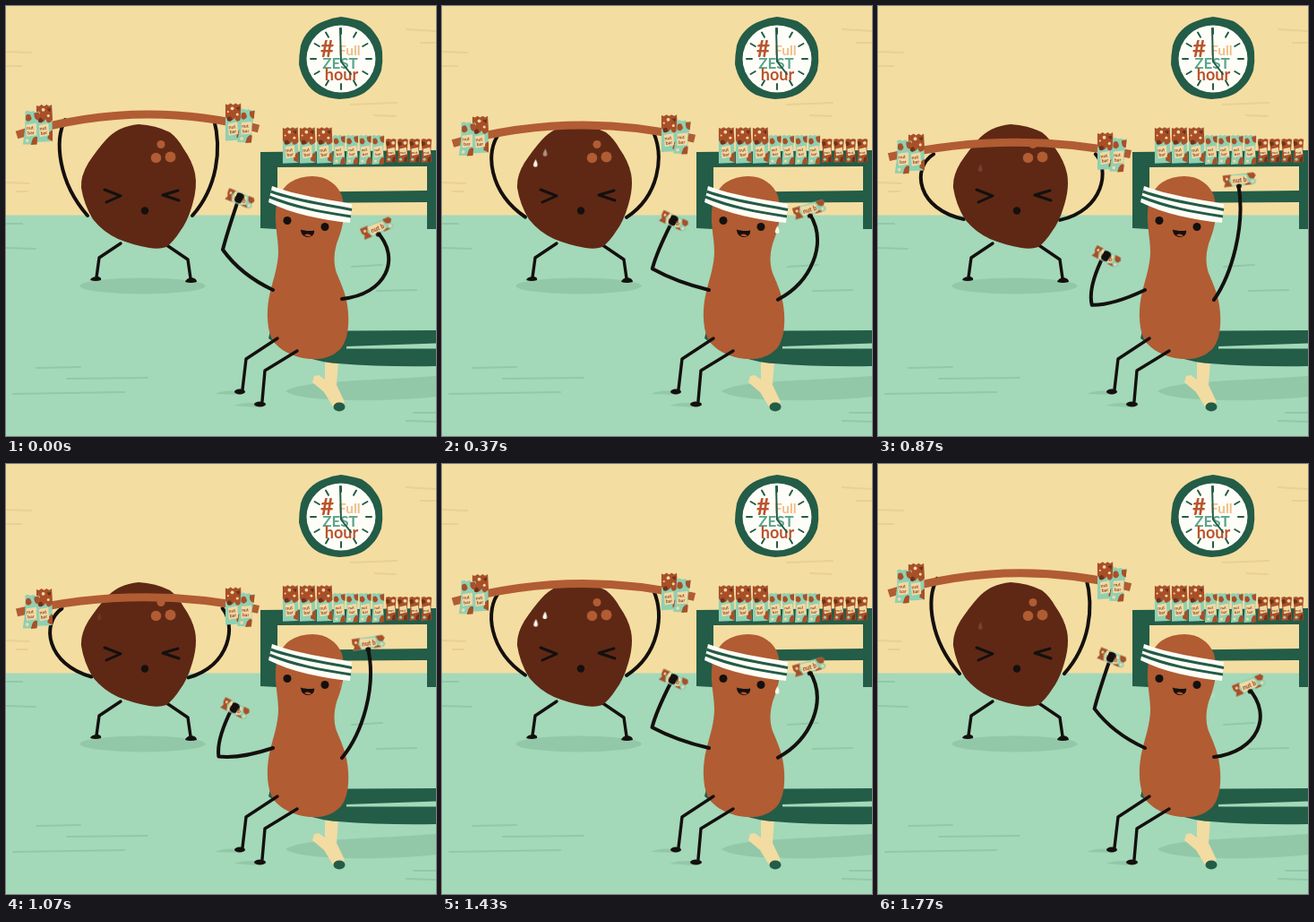
Animation, 480 px wide and 480 px high, one loop 1.81 s. Source, as an HTML page:

```html
<!DOCTYPE html>
<html lang="en">
<head>
<meta charset="utf-8">
<title>Workout snacks</title>
<style>
  html, body { margin: 0; width: 100%; height: 100%; overflow: hidden; background: #f4dda1; }
  svg { display: block; width: 100vw; height: 100vh; }
  text { font-family: Lato, "Open Sans", sans-serif; font-weight: 700; }

  .green { fill: #235c47; }
  .nut { fill: #b15c33; }
  .shade { fill: #92c8a8; }
  .ink { fill: #14100e; }
  .line { fill: none; stroke: #14100e; stroke-width: 3.4; stroke-linecap: round; stroke-linejoin: round; }
  .arm { stroke-width: 4; }
  .wall, .floor { fill: none; stroke-width: 2; stroke-linecap: round; }
  .wall { stroke: #e8d096; }
  .floor { stroke: #92c8aa; }

  /* One lift lasts half a loop and is then played backwards. */
  .lift {
    animation: 905ms cubic-bezier(.37, .15, .63, .85) infinite alternate;
  }
  #weights { animation-name: weights; }
  #rod { animation-name: rod; }
  #ballArmL { animation-name: ballArmL; }
  #ballArmR { animation-name: ballArmR; }
  #armL { animation-name: armL; }
  #armR { animation-name: armR; }
  #barL { animation-name: barL; }
  #barR { animation-name: barR; }

  @keyframes weights { to { transform: translateY(33px); } }
  @keyframes rod {
    from { d: path("M12 144Q147 102 282 137"); }
    to { d: path("M12 169Q147 138 282 166"); }
  }
  @keyframes ballArmL {
    from { d: path("M91 234C58 196 54 150 66 127"); }
    to { d: path("M96 238C44 228 36 182 62 166"); }
  }
  @keyframes ballArmR {
    from { d: path("M208 234C236 202 241 160 232 126"); }
    to { d: path("M203 239C253 228 259 182 243 166"); }
  }
  @keyframes armL {
    0% { d: path("M298 317Q262 300 242 272Q246 256 258 220"); animation-timing-function: cubic-bezier(.37, .15, .685, .575); }
    50% { d: path("M298 317Q262 311 232.500 300Q237 282 255 250"); animation-timing-function: cubic-bezier(.315, .425, .63, .85); }
    100% { d: path("M298 317Q262 335 239 335Q234 316 251 281"); }
  }
  @keyframes armR {
    0% { d: path("M375 327C424 322 442 282 414 252"); animation-timing-function: cubic-bezier(.37, .15, .685, .575); }
    50% { d: path("M375 328C408 304 428 260 409 225"); animation-timing-function: cubic-bezier(.315, .425, .63, .85); }
    100% { d: path("M375 328C394 300 410 245 402 198"); }
  }
  @keyframes barL {
    from { transform: translate(261px, 215px) rotate(22deg); }
    to { transform: translate(255px, 281px) rotate(28deg); }
  }
  @keyframes barR {
    from { transform: translate(414px, 248px) rotate(-23deg); }
    to { transform: translate(403px, 193px) rotate(-6deg); }
  }

  .drop { fill: #fdf8ec; opacity: 0; animation: 905ms linear infinite; }
  #dropA { animation-name: dropA; }
  #dropB { animation-name: dropB; }
  #dropC { animation-name: dropC; }
  @keyframes dropA {
    0%, 29% { transform: translate(115px, 160px); opacity: 0; }
    53% { opacity: 1; }
    70% { opacity: 1; }
    96% { opacity: .13; }
    100% { transform: translate(114px, 182px); opacity: 0; }
  }
  @keyframes dropB {
    0%, 17% { transform: translate(104px, 170px); opacity: 0; }
    36% { transform: translate(104px, 175px); opacity: 1; }
    68% { opacity: 1; }
    88%, 100% { transform: translate(105px, 181px); opacity: 0; }
  }
  @keyframes dropC {
    0%, 17% { transform: translate(374px, 246px); opacity: 0; }
    36% { opacity: 1; }
    70% { opacity: 1; }
    96% { opacity: .1; }
    100% { transform: translate(374px, 259px); opacity: 0; }
  }
</style>
</head>
<body>
<svg viewBox="0 0 480 480" preserveAspectRatio="none">
  <defs>
    <symbol id="pack" viewBox="0 0 20 44" overflow="visible">
      <path fill="#8fd0b2" d="M1 2L19 1L20 43L1 44Z"/>
      <path fill="#a94f28" d="M1 1L4 2L7 0L10 2L13 0L16 2L19 0L20 18Q14 25 12 17Q7 25 1 16Z"/>
      <path fill="#a94f28" d="M14 40Q15 31 20 30V43Z"/>
      <path fill="#6f321b" d="M3 17Q7 13 9 19Q6 23 3 20ZM13 5L18 4L17 9Z"/>
      <g fill="#f2d9a3">
        <circle cx="9" cy="6" r="2"/><circle cx="15" cy="13" r="1.6"/><circle cx="4" cy="10" r="1.1"/>
        <path d="M4 24L15 22L16 36L5 38Z"/>
      </g>
      <g font-size="5.500" fill="#8d4224" transform="rotate(-8 10 30)">
        <text x="5" y="29.500">nut</text><text x="5.500" y="35">bar</text>
      </g>
    </symbol>
    <symbol id="mintPack" viewBox="0 0 14 34" overflow="visible">
      <path fill="#8fd0b2" d="M0 1L3 0L5 1L8 0L11 1L14 0L13 17L14 33L0 34L1 17Z"/>
      <path fill="#a94f28" d="M1 5Q5 1 7 8Q4 13 1 9ZM9 2L14 1V9Q9 9 9 2ZM9 29Q11 24 14 26V33L8 34Z"/>
      <path fill="#f2d9a3" d="M2 14L12 12L13 24L3 26Z"/>
      <circle cx="4" cy="30" r="1.7" fill="#f2d9a3"/>
      <g font-size="4.500" fill="#8d4224" transform="rotate(-8 7 19)">
        <text x="3" y="18.500">nut</text><text x="3.500" y="23.500">bar</text>
      </g>
    </symbol>
    <symbol id="brownPack" viewBox="0 0 12 28" overflow="visible">
      <path fill="#a94f28" d="M0 1L3 0L6 1L9 0L12 1L11 14L12 27L0 28L1 14Z"/>
      <path fill="#6f321b" d="M0 4Q4 1 5 7L1 9ZM8 22L11 20V27H7Z"/>
      <path fill="#f2d9a3" d="M2 12L10 10L11 18L3 20Z"/>
      <circle cx="8.500" cy="5" r="2" fill="#f2d9a3"/>
      <circle cx="3.500" cy="24" r="1.700" fill="#8fd0b2"/>
      <text x="2.500" y="17.500" font-size="4.500" fill="#8d4224">nut</text>
    </symbol>
    <g id="bar">
      <path fill="#8fd0b2" d="M-17 -6L-15 -4L-17 -1L-15 2L-17 6H16L18 3L16 0L18 -3L16 -6Z"/>
      <path fill="#a94f28" d="M-17 -6H-8L-11 0L-8 6H-17L-15 2L-17 -1ZM9 -6H16L18 -3L16 0Q10 1 9 -6ZM5 6Q9 1 13 6Z"/>
      <path fill="#f2d9a3" d="M-9 -5L8 -4L9 4L-8 5Z"/>
      <g fill="#f2d9a3"><circle cx="-13" cy="-2" r="1.500"/><circle cx="14" cy="3" r="1.600"/></g>
      <text x="-7" y="2.500" font-size="6.500" fill="#8d4224">nut b</text>
    </g>
    <path id="drop" d="M.6 -4.500Q3 1 2.500 2.500A2.500 2.500 0 0 1 -2.300 2Q-2 -.5 .6 -4.500Z"/>
  </defs>

  <!-- Room -->
  <rect width="480" height="480" fill="#f4dda1"/>
  <rect y="233.500" width="480" height="247" fill="#a3d8b9"/>
  <path class="wall" d="M0 51L28 52M0 67H17M447 26L480 28M463 41H480M385 110L436 108M411 122L435 123M0 197L26 198M12 207H24"/>
  <path class="floor" d="M0 243H18M0 270L33 271M34 404L83 403M68 416L158 415M8 433L132 431M414 318L458 317M386 291L420 289M455 454H480M447 463L480 464"/>

  <!-- Clock -->
  <path class="green" d="M374 12C383 13 390 15 397 17Q407 23 412 31Q419 40 420 51Q421 62 419 72Q415 83 409 89Q401 98 391 101Q382 104 372 104Q360 103 350 99Q340 94 335 85Q329 76 327 65Q327 55 329 44Q332 34 339 27Q346 20 355 17Q364 13 374 12Z"/>
  <ellipse cx="374" cy="59" rx="38.500" ry="37.500" fill="#fffdf8"/>
  <g id="ticks" stroke="#235c47" stroke-width="2" stroke-linecap="round"></g>
  <text x="351" y="57" font-size="26" fill="#b9552c">#</text>
  <text x="371" y="55" font-size="15.500" fill="#edc086">Full</text>
  <text x="373" y="70" font-size="17" text-anchor="middle" fill="#5aa48a">ZEST</text>
  <text x="374.500" y="83" font-size="18" text-anchor="middle" fill="#b9552c">hour</text>
  <path d="M373 25L374 62L385 76" fill="none" stroke="#235c47" stroke-width="2" stroke-linecap="round" stroke-linejoin="round"/>

  <!-- Shelf -->
  <path class="green" d="M284 163L480 161V249H470V219L303 220L302 249L284 248ZM303 180V208L470 206V179Z" fill-rule="evenodd"/>
  <g id="shelf"></g>

  <!-- Lifter -->
  <ellipse class="shade" cx="152.500" cy="312.500" rx="70" ry="9"/>
  <path class="line" d="M128 265L104 281L101 303M178 266L203 283L206 304"/>
  <path class="ink" d="M94 306Q95 302 103 302Q107 303 106 306Q100 308 94 306ZM200 308Q201 304 207 303Q213 304 213 308Q206 310 200 308Z"/>
  <path id="ballArmL" class="line arm lift" d="M91 234C58 196 54 150 66 127"/>
  <path id="ballArmR" class="line arm lift" d="M208 234C236 202 241 160 232 126"/>
  <path fill="#5e2815" d="M148 132Q167 133 183 141Q192 148 198 159Q208 173 211 187Q214 202 208 222Q203 240 194 252Q187 263 179 269Q171 272 160 270Q142 267 125 260Q108 252 97 238Q87 222 84 203Q83 190 92 175Q102 160 111 150Q125 134 148 132Z"/>
  <g class="nut">
    <circle cx="173" cy="154.500" r="4.500"/><circle cx="167.500" cy="169.500" r="5.800"/><circle cx="183.500" cy="168.500" r="6"/>
  </g>
  <path class="line" style="stroke-width: 3" d="M110 205L128 212L112 219M192 206L175 211L193 217"/>
  <circle class="ink" cx="155" cy="228.500" r="4.200"/>
  <use id="dropA" class="drop" href="#drop"/>
  <use id="dropB" class="drop" href="#drop"/>
  <path id="rod" class="lift" d="M12 144Q147 102 282 137" fill="none" stroke="#b15c33" stroke-width="9"/>
  <g id="weights" class="lift">
    <use href="#pack" x="33" y="108" width="19" height="46"/>
    <use href="#mintPack" x="20" y="117" width="16" height="38" transform="rotate(4 28 136)"/>
    <use href="#pack" x="244" y="107" width="19" height="45"/>
    <use href="#mintPack" x="260" y="115" width="16" height="38" transform="rotate(6 268 134)"/>
  </g>

  <!-- Bench -->
  <path class="shade" d="M312 430C330 418 400 419 480 413V436C430 442 330 443 312 430Z"/>
  <path fill="#f2dca2" d="M356 392L371 396L369 423L378 442L366 449L355 431L342 420L344 413L349 412L356 417Z"/>
  <ellipse class="green" cx="372" cy="447.500" rx="6.500" ry="5"/>
  <path class="green" d="M295 363L480 362V402Q420 403 370 399C345 398 310 384 293 371Z"/>
  <path fill="#a3d8b9" d="M380 380L480 376.500V382.500L380 382.500Z"/>

  <!-- Sitter -->
  <path class="shade" d="M233 433Q246 427 264 431L262 434ZM254 446Q268 441 284 444L280 448Z"/>
  <path class="nut" d="M342 190C358 190 370 199 375 212C380 230 376 246 371 260C366 273 365 286 369 298C375 312 381 325 382 343C383 359 381 373 374 382C366 391 354 395 340 394C323 393 305 385 297 372C290 357 291 335 295 319C299 303 304 289 304 274C304 260 300 246 301 230C302 216 307 204 317 197Q328 190 342 190Z"/>
  <path class="line" d="M303 371L268 394L264 428M325 385L289 407L286 441"/>
  <ellipse class="ink" cx="261" cy="430.500" rx="6" ry="3"/>
  <ellipse class="ink" cx="283.500" cy="444.500" rx="6.500" ry="3"/>
  <path fill="#fffdf6" d="M297 201C326 212 356 215 386 221L384 242C353 239 319 232 293 219Z"/>
  <path d="M295.500 207C325 218 355 221 386 227.500M294 213C323 225 353 230 385 235" fill="none" stroke="#235c47" stroke-width="3"/>
  <circle class="ink" cx="314" cy="239.500" r="4.500"/>
  <circle class="ink" cx="356" cy="246.500" r="4.500"/>
  <path class="ink" d="M329 249.500C333 251 340 251.500 344 250.500C345 255 341 258 337 258C332 258 329 254 329 249.500Z"/>
  <path fill="#b9552c" d="M333 256Q337 253 341 256.500Q337 258 333 256Z"/>
  <use id="dropC" class="drop" href="#drop"/>

  <path id="armL" class="line arm lift" d="M298 317Q262 300 242 272Q246 256 258 220"/>
  <g id="barL" class="lift">
    <use href="#bar" transform="scale(.9 1.100)"/>
    <path class="ink" d="M-5 -5Q1 -8 4 -4L3 4Q-1 7 -5 4Z"/>
  </g>
  <path id="armR" class="line arm lift" d="M375 327C424 322 442 282 414 252"/>
  <g id="barR" class="lift">
    <use href="#bar" transform="scale(1.050 1.100)"/>
    <ellipse class="ink" cx="-1" cy="7" rx="3" ry="2.500"/>
  </g>
</svg>
<script>
  const NS = "http://www.w3.org/2000/svg";

  function add(parent, tag, attrs) {
    const el = document.createElementNS(NS, tag);
    for (const key in attrs) el.setAttribute(key, attrs[key]);
    document.getElementById(parent).append(el);
  }

  for (let i = 0; i < 12; i++) {
    add("ticks", "path", { d: "M0 -28V-34", transform: `translate(374 59) rotate(${i * 30})` });
  }

  function row(name, count, x, y, step, width, height) {
    for (let i = 0; i < count; i++) {
      add("shelf", "use", { href: "#" + name, x: x + i * step, y, width, height });
    }
  }
  row("pack", 3, 308, 134, 19, 18.5, 43);
  row("mintPack", 4, 365, 144, 14.5, 13.6, 33);
  row("brownPack", 4, 424, 148, 13.2, 11.6, 27);
</script>
</body>
</html>
```
